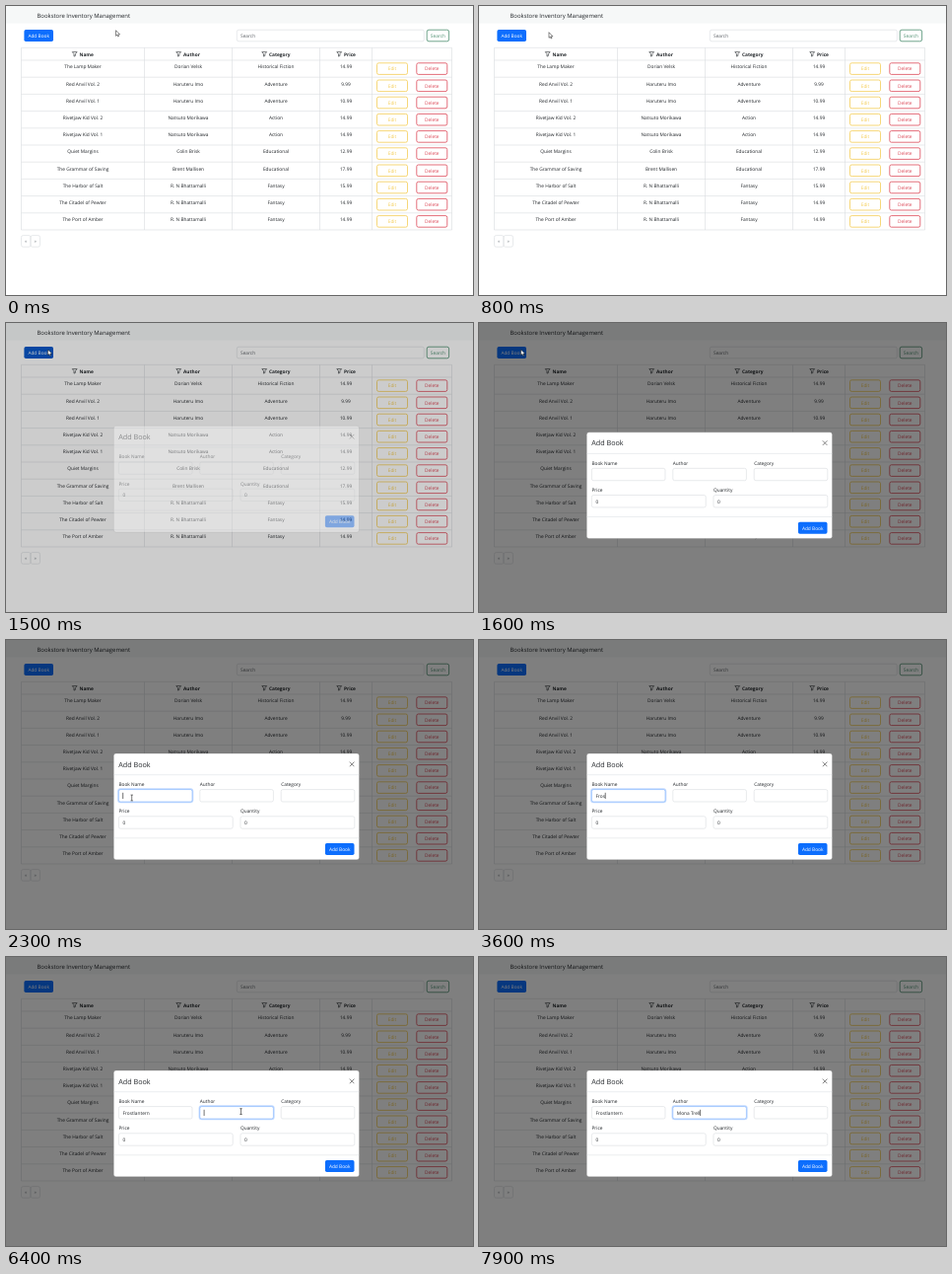
An HTML page for the animation above (8 s loop, 474 by 293 pixels).

```html
<!DOCTYPE html>
<html lang="en">
<head>
<meta charset="utf-8">
<title>Bookstore Inventory Management</title>
<style>
  html, body { margin: 0; width: 100%; height: 100%; overflow: hidden; background: #fff; }
  svg { display: block; width: 100vw; height: 100vh; }
  text { font: 4.8px "Open Sans", "Noto Sans", sans-serif; fill: #212529;
         text-rendering: geometricPrecision; white-space: pre; }
</style>
</head>
<body>
<svg id="stage" viewBox="0 0 474 293"></svg>
<script>
const LOOP = 8000, STEP = 100;
const BLUE = '#0d6efd', LINE = '#d8dce0';
const stage = document.getElementById('stage');

function add(parent, tag, attrs = {}) {
  const el = document.createElementNS('http://www.w3.org/2000/svg', tag);
  for (const key in attrs) el.setAttribute(key, attrs[key]);
  parent.append(el);
  return el;
}
function label(parent, text, x, y, attrs = {}) {
  const el = add(parent, 'text', { x, y });
  Object.assign(el.style, attrs);
  el.textContent = text;
  return el;
}
const centered = (parent, text, x, y, attrs) =>
  label(parent, text, x, y, { textAnchor: 'middle', ...attrs });
const box = (parent, x, y, width, height, attrs) =>
  add(parent, 'rect', { x, y, width, height, rx: 1.8, fill: 'none', ...attrs });
const path = (parent, d, attrs) => add(parent, 'path', { d, fill: 'none', ...attrs });

function outlineButton(parent, text, x, y, width, color) {
  box(parent, x, y, width, 11.6, { stroke: color, 'stroke-width': .8 });
  centered(parent, text, x + width / 2, y + 7.6, { fill: color });
}
function solidButton(parent, x, y) {
  const rect = box(parent, x, y, 29.6, 12, { fill: BLUE });
  centered(parent, 'Add Book', x + 14.8, y + 7.8, { fill: '#fff' });
  return rect;
}

// Page
const page = add(stage, 'g');
box(page, 0, 0, 474, 293, { rx: 0, fill: '#fff' });
box(page, 0, 0, 474, 17.5, { rx: 0, fill: '#f6f8f8' });
label(page, 'Bookstore Inventory Management', 31.5, 11.7, { fontSize: '5.94px' });
const openButton = solidButton(page, 18.4, 24);
box(page, 234.3, 24.2, 190, 11.6, { stroke: LINE, 'stroke-width': .6 });
label(page, 'Search', 238, 31.8, { fill: '#5d6166' });
outlineButton(page, 'Search', 427.2, 24.2, 22.4, '#4d8f70');

const books = [
  ['The Lamp Maker', 'Dorian Velsk', 'Historical Fiction', '14.99'],
  ['Red Anvil Vol. 2', 'Haruteru Imo', 'Adventure', '9.99'],
  ['Red Anvil Vol. 1', 'Haruteru Imo', 'Adventure', '10.99'],
  ['Rivetjaw Kid Vol. 2', 'Natsuto Morikawa', 'Action', '14.99'],
  ['Rivetjaw Kid Vol. 1', 'Natsuto Morikawa', 'Action', '14.99'],
  ['Quiet Margins', 'Colin Brisk', 'Educational', '12.99'],
  ['The Grammar of Saving', 'Brent Mallisen', 'Educational', '17.99'],
  ['The Harbor of Salt', 'R. N Bhattamalli', 'Fantasy', '15.99'],
  ['The Citadel of Pewter', 'R. N Bhattamalli', 'Fantasy', '14.99'],
  ['The Port of Amber', 'R. N Bhattamalli', 'Fantasy', '14.99'],
];
const TOP = 55, ROW = 17.2, BOTTOM = TOP + ROW * books.length;
const columns = [15.5, 140.5, 229.5, 318.5, 371.5, 452.5];
let grid = columns.map(x => `M${x} 42.3V${BOTTOM}`).join('') + 'M15.5 42.3H452.5';
for (let i = 0; i <= books.length; i++) grid += `M15.5 ${TOP + ROW * i}H452.5`;
path(page, grid, { stroke: LINE, 'stroke-width': .6 });

[['Name', 74.5], ['Author', 180], ['Category', 267], ['Price', 343]].forEach(([text, x]) => {
  path(page, `M${x - 7.2} 46.6h4.8l-1.7 2.1v1.8l-1.4 .6v-2.4z`,
    { stroke: '#212529', 'stroke-width': .6, 'stroke-linejoin': 'round' });
  label(page, text, x, 50.7, { fontWeight: 700 });
});
books.forEach((book, i) => {
  const y = TOP + ROW * i;
  book.forEach((text, c) => centered(page, text, (columns[c] + columns[c + 1]) / 2, y + 8.4));
  outlineButton(page, 'Edit', 376.5, y + 2.8, 31, '#f4cd57');
  outlineButton(page, 'Delete', 416.8, y + 2.8, 31, '#dc4a59');
});
['«', '»'].forEach((text, i) => {
  box(page, 15.5 + 9.5 * i, 232.6, 9.5, 11.6, { stroke: LINE, 'stroke-width': .6 });
  centered(page, text, 20.2 + 9.5 * i, 239.8, { fill: '#7c8288' });
});

// Dialog
const backdrop = box(stage, 0, 0, 474, 293, { rx: 0, fill: '#000' });
const modal = add(stage, 'g');
box(modal, 109.3, 115, 249.2, 107.8, { rx: 2.4, fill: '#fff', stroke: '#777', 'stroke-width': .3 });
label(modal, 'Add Book', 114.3, 128.6, { fontSize: '7.2px' });
path(modal, 'M348.8 123.6l4.6 4.6m0 -4.6l-4.6 4.6', { stroke: '#666', 'stroke-width': .8 });
path(modal, 'M109.5 136.7H358.3M109.5 200.8H358.3', { stroke: LINE, 'stroke-width': .5 });
solidButton(modal, 323.9, 206);

function field(name, x, y, width, value = '') {
  label(modal, name, x, y - 3.5);
  const ring = box(modal, x - .6, y - .6, width + 1.2, 13.6,
    { rx: 2.4, stroke: BLUE, 'stroke-opacity': .25, 'stroke-width': 1.3 });
  const border = box(modal, x, y, width, 12.4, { 'stroke-width': .6 });
  const text = label(modal, value, x + 4, y + 8.2);
  const caret = path(modal, `M0 ${y + 3.2}v6.2`, { stroke: '#111', 'stroke-width': .6 });
  const show = (focused, caretOn) => {
    ring.style.display = focused ? '' : 'none';
    border.setAttribute('stroke', focused ? '#86b7fe' : LINE);
    caret.style.display = focused && caretOn ? '' : 'none';
    const end = text.textContent ? text.getComputedTextLength() : 0;
    caret.setAttribute('transform', `translate(${x + 4.3 + end} 0)`);
  };
  show(false);
  return { text, show };
}
const inputs = [
  { ...field('Book Name', 114.4, 151.6, 74.6), value: 'Frostlantern', focus: 2300, blur: 6400,
    keys: [3000, 3200, 3300, 3600, 3800, 3900, 4400, 4600, 4800, 4900, 5000, 5100] },
  { ...field('Author', 196.8, 151.6, 74.6), value: 'Mona Trell', focus: 6400, blur: LOOP,
    keys: [6700, 6900, 7000, 7200, 7300, 7500, 7600, 7700, 7800, 7900] },
];
field('Category', 279.2, 151.6, 74.6);
field('Price', 114.4, 178.8, 115.8, '0');
field('Quantity', 238, 178.8, 115.8, '0');

// Pointer
const pointer = add(stage, 'g');
const outlined = { fill: '#fff', stroke: '#111', 'stroke-width': .5, 'stroke-linejoin': 'round' };
const shapes = {
  arrow: path(pointer, 'M0 0V5.6L1.3 4.5 2.1 6.3 3 5.9 2.2 4.1H4z', outlined),
  hand: path(pointer, 'M-.6 .4Q0 -.4 .6 .4V2.4L2.8 2.9Q3.3 3.1 3.2 3.8L2.7 6.2H-.2L-1.9 3.8Q-1.6 3 -.6 3.7z', outlined),
  beam: path(pointer, 'M-1.2 -2.9H1.2M0 -2.9V2.9M-1.2 2.9H1.2', { stroke: '#222', 'stroke-width': .6 }),
};
const track = [
  [400, 111.5, 24.7], [1100, 44.7, 28], [1400, 44.7, 28], [1500, 42.6, 27], [1600, 42.6, 27],
  [2200, 128.5, 161], [2300, 127.7, 160], [2500, 125, 156.6], [5600, 125, 156.6], [6300, 238.5, 156.6],
];
const clamp = v => Math.min(1, Math.max(0, v));
const smooth = p => p * p * (3 - 2 * p);

function pointerAt(t) {
  const next = track.findIndex(key => key[0] > t);
  if (next === 0) return track[0].slice(1);
  if (next < 0) return track[track.length - 1].slice(1);
  const [t0, x0, y0] = track[next - 1], [t1, x1, y1] = track[next];
  const p = smooth((t - t0) / (t1 - t0));
  return [x0 + (x1 - x0) * p, y0 + (y1 - y0) * p];
}

function render(t) {
  const sinceOpen = t - 1440;
  const fade = clamp(sinceOpen / 150);
  const slide = 1 - (1 - clamp(sinceOpen / 300)) ** 1.7;
  backdrop.setAttribute('opacity', fade * .5);
  modal.setAttribute('opacity', fade);
  modal.setAttribute('transform', `translate(0 ${-15.6 * (1 - slide)})`);

  for (const input of inputs) {
    const typed = input.keys.filter(k => k <= t);
    input.text.textContent = input.value.slice(0, typed.length);
    const lastReset = typed.length ? typed[typed.length - 1] : input.focus + 100;
    input.show(t >= input.focus && t < input.blur, (t - lastReset) % 1000 < 400);
  }

  const [x, y] = pointerAt(t);
  const overButton = t < 1500 && x < 48;
  const overInput = t > 1600 && y > 151 && y < 164 && (x < 189 || x > 197);
  const shape = overButton ? 'hand' : overInput ? 'beam' : 'arrow';
  for (const name in shapes) shapes[name].style.display = name === shape ? '' : 'none';
  const hidden = (t >= 3000 && t < 5700) || t >= 6700;
  pointer.style.display = hidden ? 'none' : '';
  pointer.setAttribute('transform', `translate(${x} ${y})`);
  openButton.setAttribute('fill', t >= 1400 && t < 1600 ? '#0a58ca' : overButton ? '#0b5ed7' : BLUE);
}

const start = performance.now();
function tick() {
  const t = (performance.now() - start) % LOOP;
  render(Math.floor(t / STEP) * STEP);
  requestAnimationFrame(tick);
}
tick();
</script>
</body>
</html>
```
